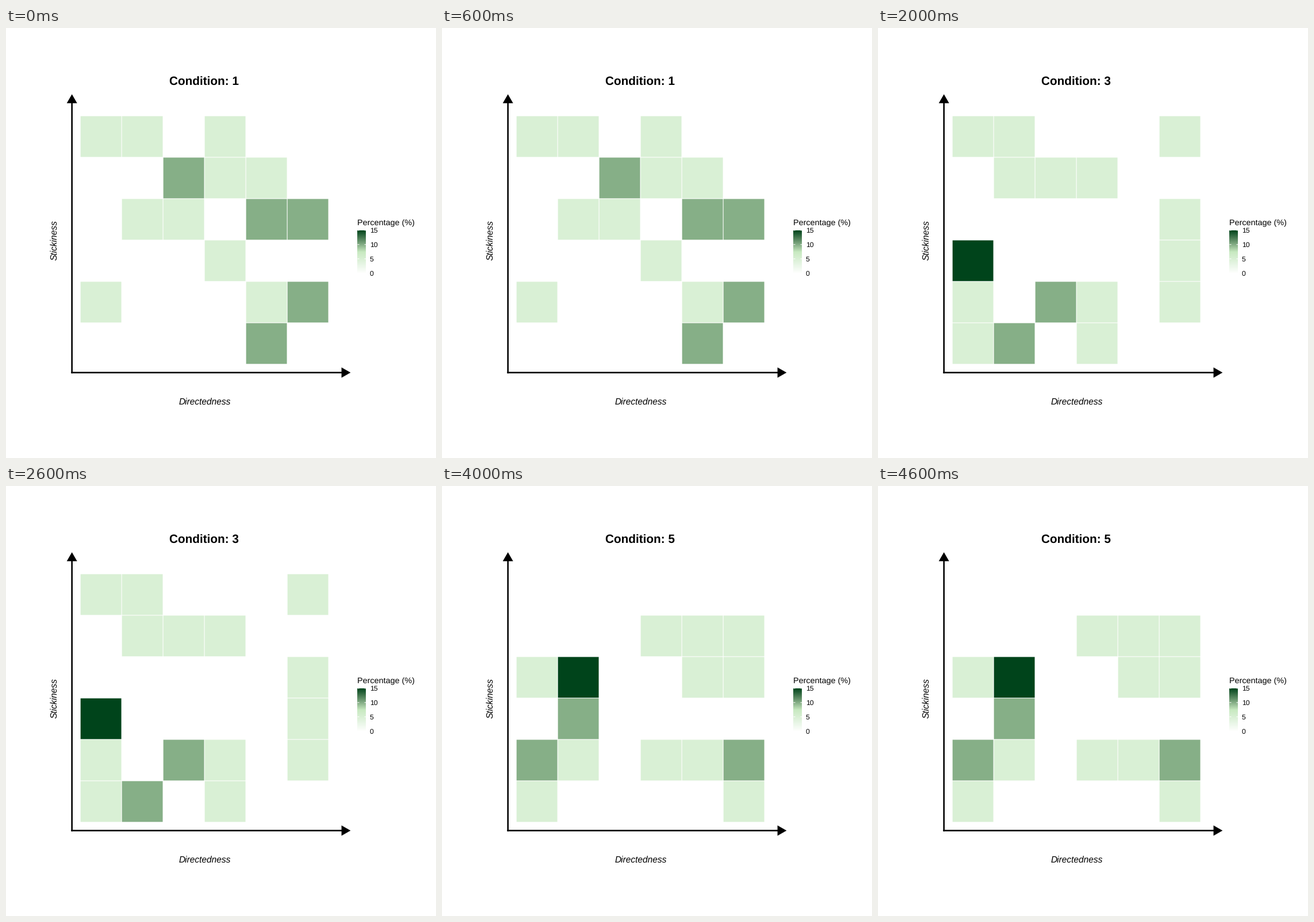
Write a matplotlib script that moves like this. It is 748 px wide and 748 px high and loops after 5000 ms.

```python
import numpy as np
import matplotlib.pyplot as plt
from matplotlib.animation import FuncAnimation
from matplotlib.colors import LinearSegmentedColormap
from matplotlib.patches import Polygon, Rectangle

SIZE, DPI = 748, 100
CELL, PITCH = 70.9, 72
LEFT, TOP = 129.7, 153.4

# Each digit is a share in steps of 5 %, rows from top to bottom
GRIDS = [
    "110100 002110 011022 000100 100012 000020",
    "013000 300003 101001 100000 011011 020000",
    "110001 011100 000001 300001 102101 120100",
    "101010 100200 110010 100100 010102 201101",
    "000000 000111 130011 020000 210112 100001",
]

plt.rcParams["font.family"] = "Liberation Sans"
plt.rcParams["text.hinting"] = "none"

greens = LinearSegmentedColormap.from_list("greens", [
    (0, "#ffffff"), (1 / 3, "#d9f0d5"), (1 / 2, "#c7e9c0"),
    (2 / 3, "#86af87"), (5 / 6, "#457850"), (1, "#00441b"),
], N=301)

fig = plt.figure(figsize=(SIZE / DPI, SIZE / DPI), dpi=DPI, facecolor="white")
ax = fig.add_axes([0, 0, 1, 1])


def label(x, y, text, px, **kw):
    return ax.text(x, y, text, fontsize=px * 72 / DPI, color="black",
                   ha="left", va="baseline", **kw)


def line(xs, ys, px, color="black", **kw):
    ax.plot(xs, ys, color=color, lw=px * 72 / DPI,
            solid_capstyle="butt", **kw)


def fill(points):
    ax.add_patch(Polygon(points, fc="black", lw=0))


# Legend
ax.imshow(np.linspace(1, 0, 300)[:, None], cmap=greens, vmin=0, vmax=1,
          extent=(611.5, 626.5, 426.5, 351.5), aspect="auto",
          interpolation="nearest")
label(611, 343.2, "Percentage (%)", 14.4)
for value in (0, 5, 10, 15):
    y = 426.3 - value * 74.4 / 15
    label(632.8, y + 4.4, str(value), 12.3)
    for x in (611.5, 623.5):
        line([x, x + 3], [y, y], 1, "white", snap=False)

# Axes with arrowheads
line([114.7, 114.7], [600.6, 125], 2.6, snap=False)
line([113.4, 590], [599.4, 599.4], 2.6, snap=False)
fill([(114.7, 115.2), (105.7, 130.8), (123.7, 130.8)])
fill([(599.4, 599.4), (583.6, 590.4), (583.6, 608.4)])
label(300.3, 654.8, "Directedness", 15.5, style="italic")
label(88.4, 403.7, "Stickiness", 15.5, style="italic",
      rotation=90, rotation_mode="anchor")

title = label(284, 99.2, "", 20.8, weight="bold")
cells = [
    ax.add_patch(Rectangle((LEFT + PITCH * col, TOP + PITCH * row),
                           CELL, CELL, lw=0, snap=False))
    for row in range(6) for col in range(6)
]

ax.set_xlim(0, SIZE)
ax.set_ylim(SIZE, 0)
ax.axis("off")


def draw(i):
    title.set_text(f"Condition: {i + 1}")
    for cell, level in zip(cells, GRIDS[i].replace(" ", "")):
        cell.set_facecolor(greens(int(level) / 3))
    return [title, *cells]


anim = FuncAnimation(fig, draw, frames=len(GRIDS), interval=1000,
                     repeat=True, repeat_delay=0)
plt.show()
```
